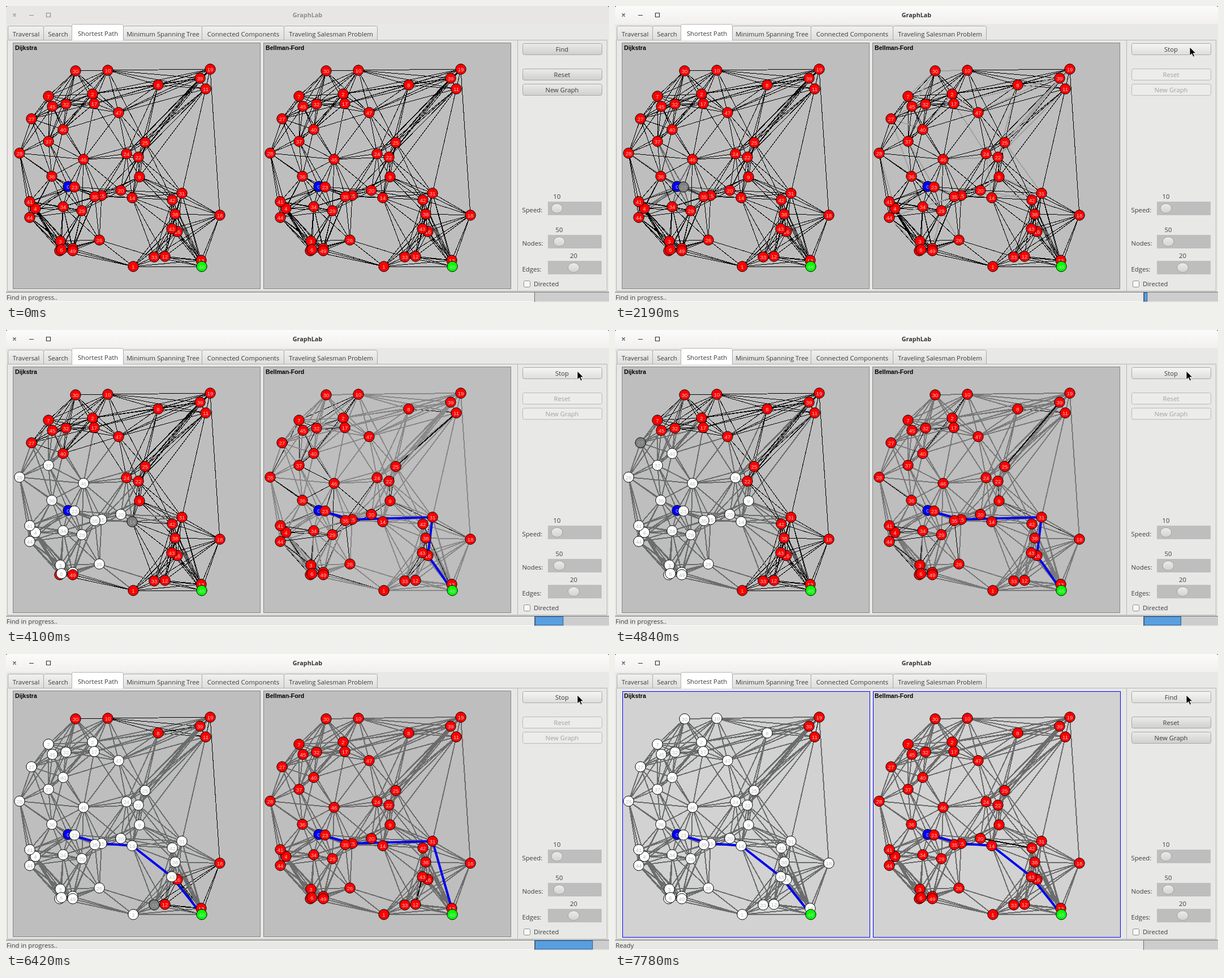
Write an HTML page that moves like this. It is 1066 px wide and 525 px high and loops after 9100 ms.

```html
<!DOCTYPE html>
<html lang="en">
<head>
<meta charset="utf-8">
<title>GraphLab</title>
<style>
html, body { margin: 0; width: 100%; height: 100%; overflow: hidden; background: #e8e8e7; }
svg { display: block; width: 1066px; height: 525px; }
text { font: 11.3px "Open Sans", "Noto Sans", sans-serif; fill: #3c3c3c; }
.mid { text-anchor: middle; }
.frame { fill: none; stroke: #b4b4b2; }
.tab { fill: url(#tabFill); stroke: #a9a9a7; }
.tab.on { fill: #fff; stroke: #b4b4b2; }
.button rect { fill: url(#buttonFill); stroke: #a8a8a6; }
.button.off rect { fill: #ececeb; stroke: #b9b9b7; }
.button.off text { fill: #a2a2a1; }
.button.down rect { fill: #cfcfce; }
.button.hover rect { fill: url(#hoverFill); }
.track { fill: #bebebe; }
.knob { fill: url(#knobFill); stroke: #a2a2a0; }
.titlebar { fill: #e7e6e5; }
.title { font-weight: bold; font-size: 10.8px; fill: #8d8d8c; }
.glyph { fill: none; stroke: #8d8d8c; stroke-width: 1.2; }
.active .titlebar { fill: url(#titleFill); }
.active .title { fill: #333; }
.active .glyph { stroke: #333; }
.panel { fill: #bebebe; stroke: #858585; }
.done .panel { fill: #d2d2d2; stroke: #00f; transform: translate(1px, 1px); }
.caption { font: bold 10.6px "Liberation Sans", Arial, sans-serif; fill: #000; }
.edges { stroke: #000; shape-rendering: crispEdges; }
.edges .seen { stroke: var(--seen, #6b6d6d); stroke-width: 2; }
.edges .now { stroke-width: 2; }
.path { fill: none; stroke: #0000f0; stroke-width: 4; }
.node circle { fill: #f00; stroke: #000; }
.node text { font: 9.5px "Liberation Sans", Arial, sans-serif; fill: #dcc; text-anchor: middle; }
.node.visited circle { fill: #fff; }
.node.visited text { fill: #bbb; }
.node.current circle { fill: #808080; }
.node.current text { fill: #aaa; }
.node.start circle { fill: #00f; }
.node.goal circle { fill: #0f0; }
.node.start text, .node.goal text { fill: #c8c8c8; }
</style>
</head>
<body>
<svg id="stage" viewBox="0 0 1066 525">
  <defs>
    <linearGradient id="tabFill" x2="0" y2="1"><stop stop-color="#f1f1f0"/><stop offset="1" stop-color="#dededd"/></linearGradient>
    <linearGradient id="buttonFill" x2="0" y2="1"><stop stop-color="#ebebea"/><stop offset="1" stop-color="#cfcfce"/></linearGradient>
    <linearGradient id="hoverFill" x2="0" y2="1"><stop stop-color="#f6f6f5"/><stop offset="1" stop-color="#dddddc"/></linearGradient>
    <linearGradient id="knobFill" x2="0" y2="1"><stop stop-color="#ececeb"/><stop offset="1" stop-color="#d2d2d1"/></linearGradient>
    <linearGradient id="titleFill" x2="0" y2="1"><stop stop-color="#fbfbfa"/><stop offset="1" stop-color="#f1f0ef"/></linearGradient>
  </defs>
  <rect width="1066" height="525" fill="#e8e8e7"/>
  <g id="header">
    <rect width="1066" height="8" fill="#222"/>
    <path class="titlebar" d="M0 32V3Q0 0 3 0H1063Q1066 0 1066 3V32Z"/>
    <path class="glyph" d="M12.5 13.500l5 5m0-5l-5 5M41 16.500h8M71.500 12.500h7v7h-7z"/>
    <text class="title mid" x="533" y="20">GraphLab</text>
  </g>
  <g id="interface">
    <path class="frame" d="M2.500 60.500H1062.500V505.500H2.500ZM904.500 61V505"/>
  </g>
  <g id="graphs"></g>
  <g id="status">
    <path d="M0 507.500H1066M934.500 507V525" stroke="#6c6c6b" fill="none"/>
    <text id="message" x="1" y="521"></text>
    <rect x="935" y="508" width="131" height="16" fill="#cdcdcd"/>
    <rect id="progress" x="935.5" y="508.5" height="15" fill="#589fe0" stroke="#275a91"/>
    <rect y="524" width="934" height="1" fill="#fff"/>
  </g>
  <path id="cursor" d="M0 0V15L3.600 11.600L6.200 17.200L8.600 16.100L6.100 10.800H11Z" fill="#000" stroke="#fff" stroke-width=".9"/>
</svg>
<script>
const LOOP = 9100, STEP = 40, START = 0, GOAL = 48, NEIGHBOURS = 10;
const T = { enter: 600, rest: 1240, press: 1430, run: 1810, settle: 2000, leftDone: 7300, finish: 7740 };
const byId = id => document.getElementById(id);

function add(parent, tag, attrs, text) {
  const el = document.createElementNS('http://www.w3.org/2000/svg', tag);
  for (const key in attrs) el.setAttribute(key, attrs[key]);
  if (text !== undefined) el.textContent = text;
  parent.appendChild(el);
  return el;
}
function set(el, name, value) {
  if (el.getAttribute(name) !== String(value)) el.setAttribute(name, value);
}
const part = (t, from, to) => Math.min(1, Math.max(0, (t - from) / (to - from)));
const mix = (a, b, f) => a + (b - a) * f;
const noise = n => { const v = Math.sin(n * 12.9898 + 4.1) * 43758.5453; return v - Math.floor(v); };

// Window controls
const ui = byId('interface');
let tabX = 4;
[['Traversal', 63], ['Search', 50], ['Shortest Path', 91], ['Minimum Spanning Tree', 139],
 ['Connected Components', 145], ['Traveling Salesman Problem', 165]].forEach(([label, width]) => {
  const on = label === 'Shortest Path', top = on ? 32.5 : 35.5, bottom = on ? 61 : 60;
  add(ui, 'path', { class: on ? 'tab on' : 'tab',
    d: `M${tabX - .5} ${bottom}V${top + 3}q0-3 3-3h${width - 6}q3 0 3 3V${bottom}` });
  add(ui, 'text', { class: 'mid', x: tabX + width / 2, y: on ? 52.5 : 53.5 }, label);
  tabX += width;
});
const [find, reset, fresh] = [['Find', 66], ['Reset', 111], ['New Graph', 138]].map(([label, y]) => {
  const box = add(ui, 'g', { class: 'button' });
  add(box, 'rect', { x: 913.5, y: y + .5, width: 140, height: 20, rx: 3 });
  return { box, text: add(box, 'text', { class: 'mid', x: 983, y: y + 15 }, label) };
});
[['Speed:', 10, 974, 347], ['Nodes:', 50, 978, 406], ['Edges:', 20, 1003.5, 452]].forEach(([label, value, x, y]) => {
  add(ui, 'text', { x: 912.5, y: y + 19 }, label);
  add(ui, 'text', { class: 'mid', x, y: y - 5 }, value);
  add(ui, 'rect', { class: 'track', x: 958, y, width: 95, height: 24 });
  add(ui, 'ellipse', { class: 'knob', cx: x, cy: y + 12, rx: 10, ry: 8.5 });
});
add(ui, 'rect', { x: 915.5, y: 487.5, width: 11, height: 11, rx: 2, fill: '#f8f8f8', stroke: '#8e8e8d' });
add(ui, 'text', { x: 933, y: 497 }, 'Directed');

// Places of the nodes; everything else about the graph follows from them
const nodes = `110,320 225,462 153,156 96,417 52,359 95,434 98,432 75,160 269,140 236,303
180,114 353,147 281,444 345,451 223,340 169,336 303,400 156,173 378,371 361,112
203,327 118,430 234,268 121,321 213,262 246,242 165,415 45,200 24,261 134,363
123,115 311,332 106,174 262,445 101,356 157,338 81,302 75,240 299,369 343,128
101,219 42,347 294,344 293,395 42,375 82,178 137,272 199,189 346,462 118,434`
  .split(/\s+/).map(pair => pair.split(',').map(Number));
const ids = nodes.map((_, i) => i);
const dist = (a, b) => Math.hypot(nodes[a][0] - nodes[b][0], nodes[a][1] - nodes[b][1]);
const nearest = ids.map(a => ids.filter(b => b !== a)
  .sort((b, c) => dist(a, b) - dist(a, c)).slice(0, NEIGHBOURS));

// True if all other nodes lie on one side of the line from a to b
function onHull(a, b) {
  const [ax, ay] = nodes[a], [bx, by] = nodes[b];
  const sides = ids.filter(i => i !== a && i !== b)
    .map(i => (bx - ax) * (nodes[i][1] - ay) > (by - ay) * (nodes[i][0] - ax));
  return sides.every(side => side === sides[0]);
}
const edges = [];
for (const a of ids) for (const b of ids.slice(a + 1)) {
  if (nearest[a].includes(b) || nearest[b].includes(a) || onHull(a, b))
    edges.push({ a, b, rank: noise(edges.length) });
}

// Shortest paths: the order in which nodes settle and the way back from each
const cost = ids.map(i => i === START ? 0 : Infinity), previous = [], order = [];
while (order.length < nodes.length) {
  const at = ids.filter(i => !order.includes(i)).reduce((a, b) => cost[b] < cost[a] ? b : a);
  order.push(at);
  edges.filter(e => e.a === at || e.b === at).forEach(({ a, b }) => {
    const to = a === at ? b : a, total = cost[at] + dist(a, b);
    if (total < cost[to]) { cost[to] = total; previous[to] = at; }
  });
}
const turn = ids.map(i => order.indexOf(i));
const shortest = [GOAL];
while (shortest[0] !== START) shortest.unshift(previous[shortest[0]]);

function makeGraph(name, x) {
  const root = add(byId('graphs'), 'g', { transform: `translate(${x} 0)` });
  add(root, 'rect', { class: 'panel', x: 12.5, y: 65.5, width: 437, height: 436 });
  add(root, 'text', { class: 'caption', x: 16, y: 78 }, name);
  const group = add(root, 'g', { class: 'edges' });
  const lines = edges.map(({ a, b }) => add(group, 'line',
    { x1: nodes[a][0], y1: nodes[a][1], x2: nodes[b][0], y2: nodes[b][1] }));
  const path = add(root, 'polyline', { class: 'path' });
  const dots = nodes.map(([cx, cy], i) => {
    const dot = add(root, 'g', { class: nodeClass(i, '') });
    add(dot, 'circle', { cx, cy, r: 9.2 });
    add(dot, 'text', { x: cx, y: cy + 3.5 }, i);
    return dot;
  });
  return { root, group, lines, path, dots };
}
const nodeClass = (i, state) => 'node ' + (i === START ? 'start' : i === GOAL ? 'goal' : state);
const drawPath = (graph, route) => set(graph.path, 'points', route.map(i => nodes[i]).join(' '));
const left = makeGraph('Dijkstra', 0), right = makeGraph('Bellman-Ford', 443);

// Nodes settle one by one at a steady pace until the goal is reached
function drawDijkstra(t) {
  const pos = t < T.run ? 0 : mix(1, turn[GOAL] + 1, part(t, T.settle, T.leftDone));
  const count = Math.floor(pos), phase = pos - count;
  const current = phase > .1 && phase < .9 ? count - 1 : -1;
  const settled = n => turn[n] < count && turn[n] !== current;
  left.dots.forEach((dot, i) =>
    set(dot, 'class', nodeClass(i, turn[i] === current ? 'current' : settled(i) ? 'visited' : '')));
  edges.forEach(({ a, b, rank }, i) => {
    const scanned = (turn[a] === current || turn[b] === current) && rank < phase;
    set(left.lines[i], 'class', settled(a) || settled(b) || scanned ? 'seen' : '');
  });
  const beforeGoal = previous[GOAL];
  drawPath(left, count > turn[beforeGoal] ? shortest : []);
  set(left.root, 'class', t >= T.leftDone ? 'done' : '');
  return count;
}

// Edges are relaxed in random order, again and again, with a deepening shade
const routes = [[2450, [0, 15, 31, 16, GOAL]], [4980, [0, 15, 31, 13, GOAL]], [7060, shortest]];
const lastEdge = edges.findIndex(({ a, b }) => a === 20 && b === 42);

function drawBellmanFord(t) {
  const covered = Math.sin(part(t, T.run, 6000) * Math.PI / 2);
  const now = t < T.run ? -1 : t >= T.finish ? lastEdge
    : Math.floor(noise(Math.floor(t / STEP)) * edges.length);
  const grey = Math.round(mix(162, 108, part(t, 2900, 5460)));
  right.group.style.setProperty('--seen', `rgb(${grey},${grey},${grey})`);
  edges.forEach(({ rank }, i) =>
    set(right.lines[i], 'class', i === now ? 'now' : rank < covered ? 'seen' : ''));
  const route = routes.filter(([from]) => t >= from).pop();
  drawPath(right, route ? route[1] : []);
  set(right.root, 'class', t >= T.finish ? 'done' : '');
}

function drawWindow(t, count) {
  const busy = t >= T.run && t < T.finish;
  set(byId('header'), 'class', t >= T.press ? 'active' : '');
  set(find.box, 'class', 'button' + (t >= T.press && t < T.run ? ' down' : t >= 1080 ? ' hover' : ''));
  find.text.textContent = busy ? 'Stop' : 'Find';
  [reset, fresh].forEach(({ box }) => set(box, 'class', busy ? 'button off' : 'button'));
  byId('message').textContent = t < T.finish ? 'Find in progress..' : 'Ready';
  set(byId('progress'), 'width', (count * 130 / nodes.length).toFixed(1));
  set(byId('progress'), 'visibility', busy ? 'visible' : 'hidden');
  const arrive = part(t, T.enter, T.rest);
  const x = mix(1000, 1016, arrive) - 6 * part(t, 3000, 3300), y = mix(26, 73, arrive);
  set(byId('cursor'), 'transform', `translate(${x.toFixed(1)} ${y.toFixed(1)})`);
  set(byId('cursor'), 'visibility', t < T.enter ? 'hidden' : 'visible');
}

const began = performance.now();
function frame() {
  const t = (performance.now() - began) % LOOP;
  const count = drawDijkstra(t);
  drawBellmanFord(t);
  drawWindow(t, count);
  requestAnimationFrame(frame);
}
frame();
</script>
</body>
</html>
```
